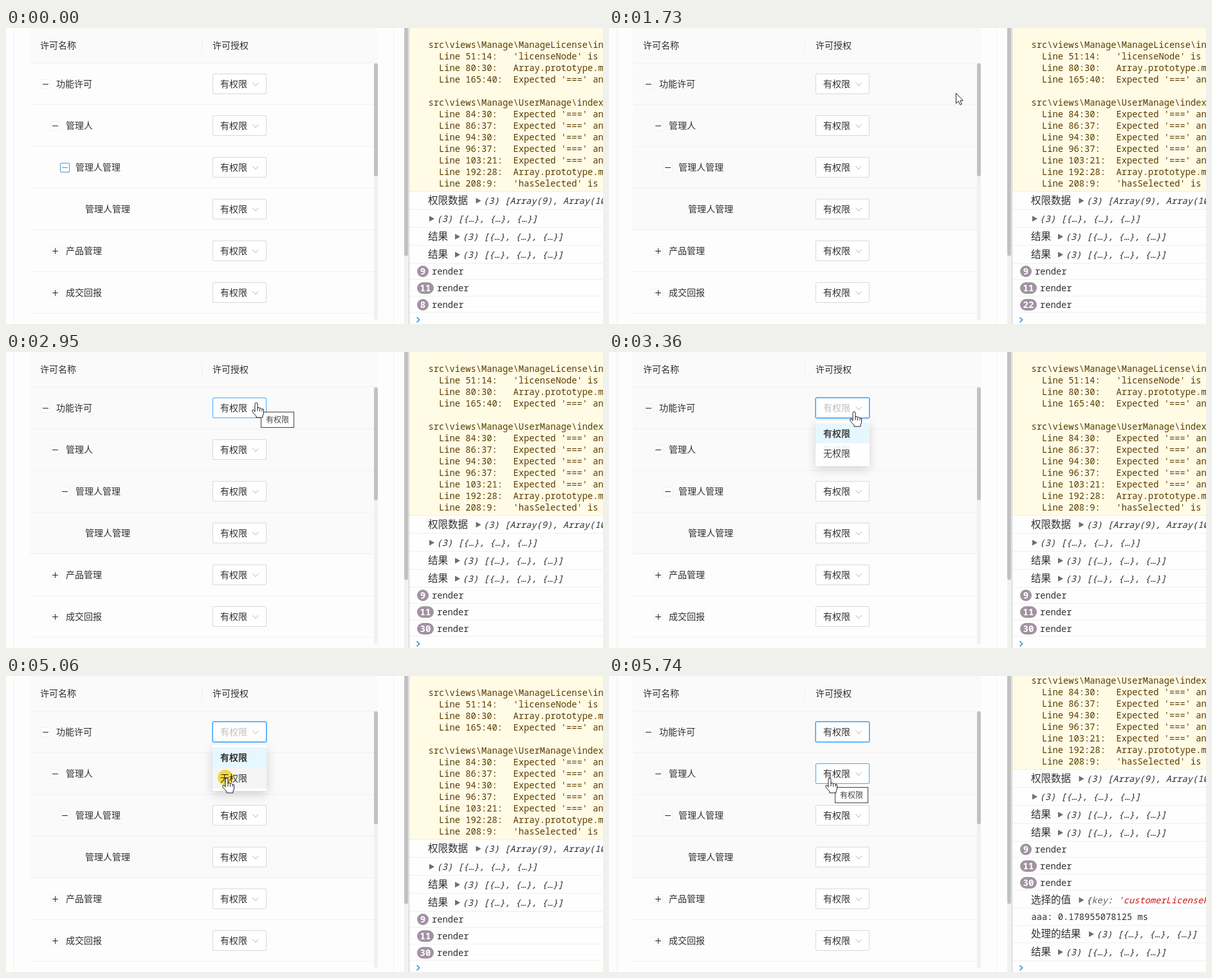
Animation of 928x461 px, one loop 8 s. Source, as an HTML page:

```html
<!DOCTYPE html>
<html lang="zh-CN">
<head>
<meta charset="utf-8">
<style>
  html, body { margin: 0; width: 100%; height: 100%; overflow: hidden; background: #fdfdfd; }
  svg { display: block; }
  text { white-space: pre; font: 14px "Noto Sans CJK SC", "Noto Sans CJK", sans-serif; fill: #303030; }
  .mono { font: 13.75px "Noto Sans Mono", monospace; fill: #303030; }
  .log { font-size: 15.5px; }
  .warn { fill: #5c3c00; }
  .preview { font-style: italic; }
  .badge { font: bold 14px "Noto Sans Mono", monospace; fill: #fff; text-anchor: middle; }
  .tip { font-size: 12px; fill: #444; }
  .menu { filter: drop-shadow(0 5px 8px rgba(0, 0, 0, .17)); }
  .click { mix-blend-mode: multiply; }
</style>
</head>
<body>
<svg id="stage" width="928" height="461" viewBox="0 0 928 461"></svg>
<script>
const LOOP = 8000;
const stage = document.getElementById('stage');

const WARNINGS = String.raw`src\views\Manage\ManageLicense\index.js
  Line 51:14:   'licenseNode' is defined
  Line 80:30:   Array.prototype.map() expects
  Line 165:40:  Expected '===' and

src\views\Manage\UserManage\index.js
  Line 84:30:   Expected '===' and
  Line 86:37:   Expected '===' and
  Line 94:30:   Expected '===' and
  Line 96:37:   Expected '===' and
  Line 103:21:  Expected '===' and
  Line 192:28:  Array.prototype.map() expects
  Line 208:9:   'hasSelected' is assigned`.split('\n');

// label, indent level, expander sign
const ROWS = [
  ['功能许可', 0, '-'], ['管理人', 1, '-'], ['管理人管理', 2, '-'],
  ['管理人管理', 3, ''], ['产品管理', 1, '+'], ['成交回报', 1, '+'],
];

// pointer keyframes: time, x, y of the hot spot
const PATH = [
  [1390, 640, 300], [1520, 600, 215], [1730, 539, 101], [1870, 470, 45], [2000, 430, 42],
  [2140, 405, 72], [2350, 394, 77], [2550, 389, 79], [3280, 389, 79], [3710, 346, 151],
  [3850, 344, 154], [3980, 344, 154], [3990, 343, 159],
];
const ARROW = 'M.5.5V16.5L4.2 13L6.8 18.5L9.4 17.5L6.8 12H11.5Z';
const HAND = 'M-2 13V2Q-2 0 0 0T2 2V9Q2 7 4 7.5T5.5 9.5Q6 8 7.5 8.5T9 10.5Q10 9 11 10T11.5 12V16Q11.5 18 10 20V23H0V21Q-3 18 -6 14Q-7 11 -5 11T-2 14Z';

const between = (t, from, to = LOOP) => t >= from && t < to;
const ramp = (t, from, to) => Math.min(1, Math.max(0, (t - from) / (to - from)));

const rect = (x, y, w, h, fill, more = '') =>
  `<rect x="${x}" y="${y}" width="${w}" height="${h}" fill="${fill}" ${more}/>`;
const path = (d, stroke, fill = 'none', width = 1) =>
  `<path d="${d}" stroke="${stroke}" fill="${fill}" stroke-width="${width}"/>`;
const label = (x, middle, content, cls = '', more = '') =>
  `<text x="${x}" y="${middle + 5}" class="${cls}" ${more}>${content}</text>`;
const mono = (x, middle, content, cls = '') => label(x, middle, content, 'mono ' + cls);

function select(y, { blue = false, focus = false, open = false }) {
  const glow = focus ? rect(320.5, y - 16.5, 85, 33, 'none', 'rx="2" stroke="#1890ff" stroke-opacity=".5"') : '';
  return glow
    + rect(321.5, y - 15.5, 83, 31, '#fff', `rx="1.5" stroke="${blue || focus ? '#40a9ff' : '#d9d9d9'}"`)
    + label(333, y, '有权限', '', open ? 'style="fill:#bfbfbf"' : '')
    + path(`M383.5 ${y - 2}l4.5 5l4.5 -5`, '#b5b5b5');
}

function expander(x, y, sign, highlight) {
  const border = highlight > 0 ? `rgba(80,150,205,${highlight})` : '#f0f0f0';
  const arms = `M${x - 4.5} ${y + .5}h9` + (sign === '+' ? `M${x} ${y - 4}v9` : '');
  return rect(x - 7, y - 6.5, 14, 14, '#fff', `rx="1.5" stroke="${border}"`)
    + path(arms, highlight > .5 ? '#5b93bd' : '#262626');
}

function table(t) {
  let s = path('M12.5 0V461M602.5 0V461', '#f0f0f0')
    + rect(37, 0, 541, 54, '#fafafa')
    + label(53, 27, '许可名称') + label(321, 27, '许可授权')
    + path('M304.5 16V39M37 54.5H578', '#f0f0f0');
  ROWS.forEach(([name, level, sign], i) => {
    const y = 87 + 65 * i, x = 61.5 + 15 * level;
    if (i < 4 && t >= 1390 + 68 * (4 - i)) s += rect(37, y - 32, 535, 64, '#fafafa');
    s += path(`M37 ${y + 32.5}H572`, '#f0f0f0');
    const highlight = i === 2 ? (t < 70 ? 1 : t < 130 ? .45 : 0) : 0;
    if (sign) s += expander(x, y, sign, highlight);
    s += label(78 + 15 * level, y, name);
    s += select(y, i === 0
      ? { blue: t >= 2480, focus: t >= 3150, open: between(t, 3220, 5190) }
      : { blue: i === 1 && t >= 5330 });
  });
  return s + rect(572, 55, 6, 400, '#f1f1f1', 'rx="3"') + rect(572, 55, 6, 176, '#c1c1c1', 'rx="3"');
}

function menu(t) {
  const shown = ramp(t, 3180, 3380) * (1 - ramp(t, 5190, 5390));
  if (!shown) return '';
  return `<g class="menu" opacity="${shown}" transform="translate(0 107) scale(1 ${.8 + .2 * shown}) translate(0 -107)">`
    + rect(321, 107, 84, 72, '#fff', 'rx="2"')
    + rect(321, 111, 84, 32, '#e6f7ff')
    + (t >= 3780 ? rect(321, 143, 84, 32, '#f5f5f5') : '')
    + label(333, 127, '有权限', '', 'style="font-weight:bold"')
    + label(333, 159, '无权限') + '</g>';
}

const logRow = (y, name, arrowX, preview) =>
  (name && label(656, y, name, 'log'))
  + path(`M${arrowX} ${y - 4.5}l8 4.5l-8 4.5Z`, 'none', '#6e6e6e')
  + mono(arrowX + 11.5, y, preview, 'preview');

function renderRow(y, count) {
  const width = count > 9 ? 26 : 18;
  return rect(639, y - 9, width, 18, '#a292a3', 'rx="9"')
    + label(639 + width / 2, y, count, 'badge')
    + mono(width + 644, y, 'render');
}

function renderCount(t) {
  if (t < 1390) return 8;
  return 8 + 2 * Math.floor(7 * ramp(t, 1390, 1730)) + 2 * Math.floor(4 * ramp(t, 1730, 2140));
}

function consolePane(t) {
  const updated = t >= 5190;
  const objects = '(3) [{…}, {…}, {…}]';
  const lines = [282, 310, 338, 366, 391, 417, 442];
  let s = rect(0, 0, 928, 254, '#fffbe5') + path('M0 254.5H928', '#fff0b5');
  WARNINGS.forEach((line, i) => s += mono(656.5, 26 + 18 * i, line, 'warn'));
  s += logRow(269, '权限数据', 730.5, '(3) [Array(9), Array(10), Array(3)]')
    + logRow(297, '', 658, objects)
    + logRow(325, '结果', 698, objects)
    + logRow(353, '结果', 698, objects)
    + renderRow(379, 9) + renderRow(405, 11) + renderRow(431, renderCount(t));
  if (updated) {
    lines.push(470, 497, 524, 552);
    s += logRow(458, '选择的值', 730.5, `{<tspan fill="#6b5a70">key</tspan>: <tspan fill="#c41a16">'customerLicenseForm'</tspan>}`)
      + mono(656.5, 484, 'aaa: 0.178955078125 ms')
      + logRow(511, '处理的结果', 746, objects)
      + logRow(539, '结果', 698, objects);
  }
  s += path(lines.map(y => `M626 ${y + .5}H928`).join(''), '#f0f0f0');
  return rect(619, 0, 7, 461, '#f1f1f1') + rect(619, -10, 6, 365, '#c1c1c1', 'rx="3"')
    + `<svg x="626" width="302" height="461" viewBox="626 0 302 461">`
    + rect(626, 0, 302, 461, '#fefefe')
    + `<g transform="translate(0 ${updated ? -109 : 0})">${s}</g>`
    + path('M638.5 450.5l4 4l-4 4', '#2f8fd8', 'none', 1.6)
    + path('M626.5 0V461', '#ccc') + '</svg>';
}

function tooltip(t) {
  const box = (x, y, content) =>
    rect(x + .5, y + .5, 51, 24, '#fff', 'stroke="#444"') + label(x + 8, y + 12, content, 'tip');
  if (between(t, 2950, 3150)) return box(396, 93, '有权限');
  if (between(t, 4530, 5060)) return box(351, 173, '无权限');
  return t >= 5740 ? box(351, 173, '有权限') : '';
}

function pointer(t) {
  if (t < PATH[0][0]) return '';
  const next = PATH.findIndex(key => key[0] > t);
  const to = PATH.at(next), from = next < 0 ? to : PATH[next - 1];
  const k = next < 0 ? 1 : ramp(t, from[0], to[0]);
  const [x, y] = [1, 2].map(i => Math.round(from[i] + (to[i] - from[i]) * k));
  const clicked = between(t, 3150, 3280) || between(t, 5060, 5190);
  const hand = t >= 2130;
  return (clicked ? `<circle class="click" cx="${x - 2}" cy="${y - 1}" r="12" fill="#fbe04c"/>` : '')
    + `<g transform="translate(${x} ${y})">`
    + path(hand ? HAND : ARROW, '#223', '#fff')
    + (hand ? path('M2 9v4M5.5 9.5v4M9 10.5v3', '#223') : '') + '</g>';
}

let shown = '';
function draw() {
  const t = performance.now() % LOOP;
  const scene = rect(0, 0, 928, 461, '#fdfdfd')
    + table(t) + consolePane(t) + menu(t) + tooltip(t) + pointer(t);
  if (scene !== shown) stage.innerHTML = shown = scene;
  requestAnimationFrame(draw);
}
draw();
</script>
</body>
</html>
```
